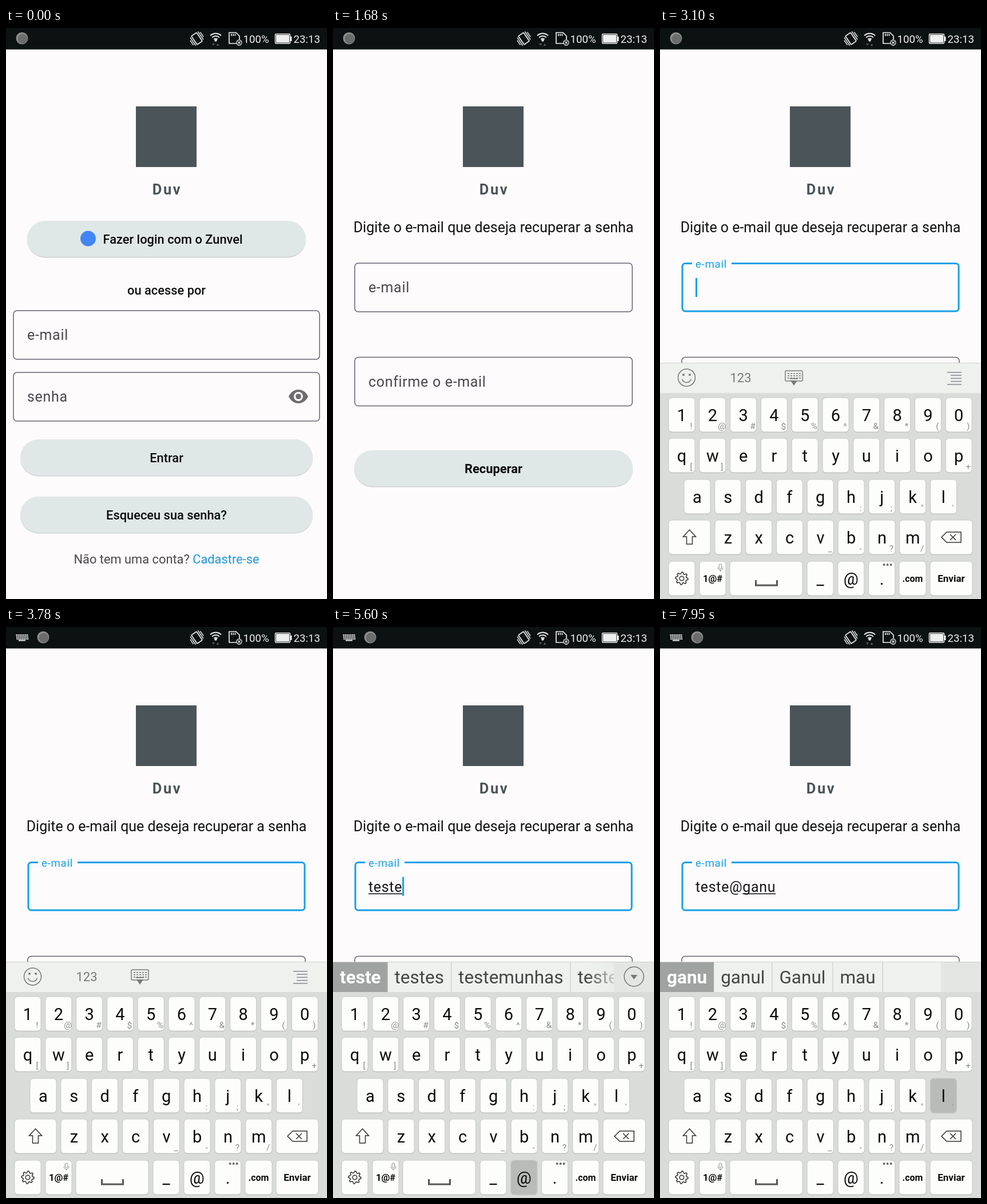
An HTML page with a canvas for the animation above (8 s loop, 561 by 998 pixels).

```html
<!DOCTYPE html>
<html lang="pt-BR">
<head>
<meta charset="utf-8">
<title>Recuperar senha</title>
<style>
html, body { margin: 0; width: 100%; height: 100%; overflow: hidden; background: #fdfbfb; }
canvas { display: block; width: 561px; height: 998px; }
</style>
</head>
<body>
<canvas id="stage" width="561" height="998"></canvas>
<script>
const W = 561, H = 998, LOOP = 8000, DP = 1.56;
const BG = '#fdfbfb', BLUE = '#15a0e8', SLATE = '#4b5459', BTN = '#e0e8e7', LINE = '#66616f';
const main = document.getElementById('stage').getContext('2d');
const buffer = document.createElement('canvas');
buffer.width = W;
buffer.height = H;
const layer = buffer.getContext('2d');
let c = main;

const clamp = v => Math.max(0, Math.min(1, v));
const span = (t, from, len) => clamp((t - from) / len);
const mix = (a, b, k) => a + (b - a) * k;

// ---------- drawing helpers ----------
function text(str, x, y, size, { weight = 400, color = '#111', align = 'left', gap = 0 } = {}) {
  c.font = `${weight} ${size}px Roboto, sans-serif`;
  c.letterSpacing = gap + 'px';
  c.textAlign = align;
  c.fillStyle = color;
  c.fillText(str, x, y);
  const w = c.measureText(str).width;
  c.letterSpacing = '0px';
  return w;
}

function box(x, y, w, h, r, fill, stroke, lw = 1) {
  c.beginPath();
  c.roundRect(x, y, w, h, r);
  if (fill) { c.fillStyle = fill; c.fill(); }
  if (stroke) { c.strokeStyle = stroke; c.lineWidth = lw; c.stroke(); }
}

function rect(x, y, w, h, fill) {
  c.fillStyle = fill;
  c.fillRect(x, y, w, h);
}

function disc(x, y, r, fill) {
  c.beginPath();
  c.arc(x, y, r, 0, 7);
  c.fillStyle = fill;
  c.fill();
}

function ring(x, y, r, stroke, lw = 1.5, a = 0, b = 7) {
  c.beginPath();
  c.arc(x, y, r, a, b);
  c.strokeStyle = stroke;
  c.lineWidth = lw;
  c.stroke();
}

function path(points, { fill, stroke, lw = 1.5, close = false }) {
  c.beginPath();
  for (let i = 0; i < points.length; i += 2) c.lineTo(points[i], points[i + 1]);
  if (close) c.closePath();
  if (fill) { c.fillStyle = fill; c.fill(); }
  if (stroke) { c.strokeStyle = stroke; c.lineWidth = lw; c.stroke(); }
}

// Draws a group on its own layer, then blends it as a whole.
function group(alpha, dy, draw) {
  layer.clearRect(0, 0, W, H);
  c = layer;
  draw();
  c = main;
  c.globalAlpha = alpha;
  c.drawImage(buffer, 0, dy);
  c.globalAlpha = 1;
}

// ---------- screens ----------
function button(x, y, w, label, { weight = 500, lx = 280.5, align = 'center' } = {}) {
  box(x, y + 1.5, w, 63, 31.5, '#cdd2d1');
  box(x, y, w, 63, 31.5, BTN);
  text(label, lx, y + 40, 14 * DP, { weight, align, color: '#0a0a0a' });
}

function field(x, y, w, label) {
  box(x, y, w, 85, 6, null, LINE, 1.5);
  text(label, x + 24, y + 51, 16 * DP, { color: '#4a4650', gap: .7 });
}

function brand() {
  rect(0, 0, W, H, BG);
  rect(227, 137, 106, 106, SLATE);
  text('Duv', 281.5, 291, 25.5, { weight: 700, color: SLATE, align: 'center', gap: 2.6 });
}

function eye(x, y) {
  c.beginPath();
  c.moveTo(x - 17, y);
  c.bezierCurveTo(x - 10, y - 16, x + 10, y - 16, x + 17, y);
  c.bezierCurveTo(x + 10, y + 16, x - 10, y + 16, x - 17, y);
  c.fillStyle = '#6f6c70';
  c.fill();
  disc(x, y, 8, BG);
  disc(x, y, 4.8, '#6f6c70');
}

function ripple(t) {
  const fade = 1 - span(t, 1150, 170);
  if (t < 950 || !fade) return;
  const tint = a => `rgba(20,160,232,${a * fade})`;
  c.save();
  c.beginPath();
  c.roundRect(25, 819, 511, 63, 31.5);
  c.clip();
  rect(25, 819, 511, 63, tint(.16 * span(t, 950, 60)));
  for (const start of [960, 990]) {
    const r = Math.min(420, Math.max(0, (t - start) * 2.1));
    disc(370 - r * .15, 851, r, tint(.12));
  }
  c.restore();
  text('Esqueceu sua senha?', 280.5, 859, 14 * DP, { weight: 500, align: 'center', color: '#0a0a0a' });
}

function login(t) {
  brand();
  button(37, 337, 487, 'Fazer login com o Zunvel', { lx: 169.5, align: 'left' });
  disc(143.5, 368, 13.5, '#4285f4');
  text('ou acesse por', 280.5, 466, 14 * DP, { weight: 500, align: 'center' });
  field(13, 494, 535, 'e-mail');
  field(13, 602, 535, 'senha');
  eye(511, 644);
  button(25, 719, 511, 'Entrar');
  button(25, 819, 511, 'Esqueceu sua senha?');
  ripple(t);
  const w = text('Não tem uma conta? ', 118.5, 936, 14 * DP, { color: '#4b474d' });
  text('Cadastre-se', 118.5 + w, 936, 14 * DP, { color: '#2196dc' });
}

// ---------- typing ----------
const FOCUS = 2800, LAG = 140;
const TAPS = [
  ['t', 4120], ['e', 4300], ['s', 4490], ['t', 4690], ['e', 5065],
  ['@', 5600], ['g', 6020], ['a', 6930], ['n', 7070], ['u', 7215], ['l', 7940]
].map(([key, at]) => ({ key, at, done: at + 65 }));

const HINTS = {
  t: ['tem', 'também', 'tudo', 'todos'],
  te: ['tem', 'tenho', 'tempo', 'ter'],
  tes: ['teste', 'testes', 'testa'],
  test: ['teste', 'testes', 'testar'],
  teste: ['testes', 'testemunhas', 'testemunho'],
  g: ['ganul', 'gestão', 'guia', 'guerra'],
  ga: ['ganul', 'gato', 'ganhar', 'garantir'],
  gan: ['ganul', 'ganhar', 'ganso'],
  ganu: ['ganul', 'Ganul', 'mau']
};

const typed = t => TAPS.filter(k => k.done <= t).map(k => k.key).join('');

function cursorOn(t) {
  const last = TAPS.reduce((m, k) => k.done <= t ? k.done : m, FOCUS);
  return (t - last) % 1000 < 500;
}

function mailField(t) {
  if (t < FOCUS) return field(38, 411, 485, 'e-mail');
  box(39, 411.5, 483, 83.5, 5, null, BLUE, 3);
  const k = 1 - (1 - span(t, FOCUS, 170)) ** 2;
  rect(56, 405, 69 * k, 12, BG);
  text('e-mail', 62, mix(462, 418.5, k), mix(16, 12, k) * DP, { color: BLUE, gap: .7 });
  const str = typed(t), size = 16 * DP, cut = str.indexOf('@') + 1;
  const head = text(str.slice(0, cut), 62, 463, size, { gap: .7, color: '#16161a' });
  const tail = text(str.slice(cut), 62 + head, 463, size, { gap: .7, color: '#16161a' });
  rect(62 + head, 465.5, tail, 1.6, '#16161a');
  if (cursorOn(t)) rect(62 + head + tail, 437, 3, 33, BLUE);
}

function recover(t) {
  brand();
  text('Digite o e-mail que deseja recuperar a senha', 280.5, 357, 16 * DP, { align: 'center' });
  mailField(t);
  field(38, 575.5, 485, 'confirme o e-mail');
  button(37, 738, 487, 'Recuperar', { weight: 700 });
}

// ---------- keyboard ----------
const STEP = 53.8;
const KEYS = [];
const rowY = row => Math.floor(646 + row * 71.5);
function addRow(row, x, labels, subs = '') {
  [...labels].forEach((label, i) =>
    KEYS.push({ label, sub: (subs[i] || ' ').trim(), x: x + i * STEP, y: rowY(row), w: 46 }));
}
function addKey(row, x, w, label, icon, size) {
  KEYS.push({ label, icon, size, x, y: rowY(row), w });
}
addRow(0, 15, '1234567890', '!@#$%^&*()');
addRow(1, 15, 'qwertyuiop', '[]       +');
addRow(2, 42, 'asdfghjkl', '     :;"\'');
addRow(3, 96, 'zxcvbnm', '   _-?/');
addKey(3, 15, 73, '', shiftIcon);
addKey(3, 472, 74, '', backIcon);
addKey(4, 15, 46, '', gearIcon);
addKey(4, 69, 46, '1@#', micIcon, 16.5);
addKey(4, 122, 127, '', spaceIcon);
addRow(4, 257, '_@.');
addKey(4, 418, 47, '.com', null, 16);
addKey(4, 472, 74, 'Enviar', null, 17);

function shiftIcon(x, y) {
  path([x, y - 13, x + 11, y - 1, x + 5, y - 1, x + 5, y + 12, x - 5, y + 12, x - 5, y - 1, x - 11, y - 1],
    { stroke: '#333', close: true });
}
function backIcon(x, y) {
  path([x - 17, y, x - 8, y - 9, x + 17, y - 9, x + 17, y + 9, x - 8, y + 9], { stroke: '#333', close: true });
  path([x - 2, y - 5, x + 8, y + 5], { stroke: '#333' });
  path([x + 8, y - 5, x - 2, y + 5], { stroke: '#333' });
}
function gearIcon(x, y) {
  const pts = [];
  for (let i = 0; i < 32; i++) {
    const a = i * Math.PI / 16, r = i % 4 < 2 ? 11 : 8.3;
    pts.push(x + r * Math.cos(a), y + r * Math.sin(a));
  }
  path(pts, { stroke: '#333', close: true });
  ring(x, y, 3.8, '#333');
}
function micIcon(x, y) {
  box(x + 11, y - 25, 5, 8, 2.5, null, '#888');
  ring(x + 13.5, y - 19, 4.5, '#888', 1, 0, Math.PI);
  path([x + 13.5, y - 15, x + 13.5, y - 12], { stroke: '#888', lw: 1 });
}
function spaceIcon(x, y) {
  path([x - 18, y + 3, x - 18, y + 12, x + 19, y + 12, x + 19, y + 3], { stroke: '#555', lw: 3 });
}

function drawKey(k, pressed) {
  const cx = k.x + k.w / 2;
  box(k.x, k.y + 1, k.w, 60, 6, '#b9bcb9');
  box(k.x, k.y, k.w, 60, 6, pressed ? '#b9bbb9' : '#fdfdfc', '#c6c9c6', 1);
  if (k.icon) k.icon(cx, k.y + 30);
  const sized = k.size > 0;
  text(k.label, cx, k.y + (sized ? 36 : 40.5), k.size || 29,
    { align: 'center', weight: sized ? 700 : 400, color: '#0b0b0b' });
  if (k.sub) text(k.sub, k.x + 39.5, k.y + 55, 15.5, { align: 'center', color: '#8c8e8c' });
  if (k.label === '.') for (let i = -1; i < 2; i++) disc(k.x + 33 + i * 6, k.y + 6, 2, '#666');
}

function toolbar() {
  const ink = '#777a78';
  ring(46.5, 611, 15, ink);
  disc(41, 606, 2, ink);
  disc(52, 606, 2, ink);
  ring(46.5, 611, 8.5, ink, 1.5, .3, Math.PI - .3);
  text('123', 141, 619, 22, { align: 'center', color: ink });
  box(219, 599, 30, 18, 2, null, ink, 1.5);
  for (let y = 603; y < 612; y += 4)
    for (let x = 223; x < 246; x += 5) rect(x, y, 3, 1.6, ink);
  rect(227, 612, 14, 1.6, ink);
  path([228, 616, 240, 616, 234, 625], { fill: ink });
  for (let i = 0; i < 5; i++) rect(i % 4 ? 508 : 502, 601 + i * 5.3, i % 4 ? 19 : 25, 1.5, '#85888f');
}

function hintBar(word, list) {
  const size = 31.5, pad = 12;
  c.save();
  c.beginPath();
  c.rect(0, 586, 491, 52);
  c.clip();
  c.font = `700 ${size}px Roboto, sans-serif`;
  let x = Math.max(74, c.measureText(word).width + 2 * pad);
  rect(0, 586, x, 52, '#a0a3a1');
  text(word, x / 2, 623, size, { weight: 700, color: '#fff', align: 'center' });
  for (const hint of list) {
    x += text(hint, x + pad, 623, size, { color: '#444746' }) + 2 * pad;
    rect(x, 586, 1, 52, '#c3c7c4');
    x += 1;
  }
  const more = x > 470;
  if (more) {
    const fade = c.createLinearGradient(445, 0, 491, 0);
    fade.addColorStop(0, 'rgba(233,236,233,0)');
    fade.addColorStop(1, 'rgba(233,236,233,.8)');
    rect(445, 586, 46, 52, fade);
  }
  c.restore();
  rect(491, 586, 70, 52, '#e3e6e3');
  if (more) {
    ring(526, 611, 17, '#777');
    path([520, 608, 532, 608, 526, 616], { fill: '#777' });
  }
}

function popup(key) {
  const x = key.x - 23, y = key.y - 109;
  box(x + 1, y + 2, 92, 106, 2, '#a9abb0');
  box(x, y, 92, 106, 2, '#fdfdfd', '#b4b7c2', 1.2);
  text(key.label, x + 46, y + 72, 56, { align: 'center', color: '#0b0b0b' });
}

function keyboard(t) {
  rect(0, 585, W, 413, '#d9dcd9');
  rect(0, 585, W, 53, '#eef1ee');
  rect(0, 585, W, 1, '#cfd2cf');
  const word = typed(t - LAG).split('@').pop();
  if (HINTS[word]) hintBar(word, HINTS[word]); else toolbar();
  const tap = TAPS.find(k => t >= k.at && t < k.at + 125);
  const active = tap && KEYS.find(k => k.label === tap.key);
  for (const k of KEYS) drawKey(k, k === active && t < tap.at + 105);
  if (active && t >= tap.at + 30) popup(active);
}

// ---------- status bar ----------
function statusBar(t) {
  const ink = '#eef0ef';
  rect(0, 0, W, 37.5, '#0c1211');
  const shown = t >= 3250;
  if (shown) {
    for (let y = 0; y < 3; y++)
      for (let x = 0; x < 7; x++) rect(17.5 + x * 3.1 + y * .4, 13 + y * 3.3, 2.3, 2.3, ink);
    rect(22, 22.5, 12, 2, ink);
  }
  const nx = shown ? 65 : 28;
  disc(nx, 18, 10.5, '#8b8e8c');
  disc(nx + 1, 19, 8.5, '#6a6d6b');

  c.save();
  c.translate(333.5, 18.5);
  c.rotate(-.6);
  box(-5.5, -9, 11, 18, 1, null, ink, 1.7);
  path([-8.5, -8, -8.5, 9], { stroke: ink });
  path([8.5, -9, 8.5, 8], { stroke: ink });
  path([-11.3, -4, -11.3, 6], { stroke: ink });
  path([11.3, -6, 11.3, 4], { stroke: ink });
  c.restore();

  for (const r of [4.5, 9, 13.5]) ring(366.5, 23, r, ink, 2, -2.35, -.79);
  disc(366.5, 21.5, 2.2, ink);
  path([360, 27, 365, 27, 362.5, 31], { fill: '#56594f' });
  path([367.5, 31, 372.5, 31, 370, 27], { fill: '#56594f' });

  path([403, 27, 390, 27, 390, 8, 402, 8, 408, 14, 408, 20], { stroke: ink, lw: 1.7 });
  for (let i = 0; i < 3; i++) rect(393 + i * 3.3, 10, 1.6, 4, ink);
  ring(407.5, 25.5, 4.5, ink, 1.3);
  path([405.5, 23.5, 409.5, 27.5], { stroke: ink, lw: 1.2 });
  path([409.5, 23.5, 405.5, 27.5], { stroke: ink, lw: 1.2 });

  text('100%', 414.5, 26, 18.7, { color: ink });
  box(470.5, 10.5, 26, 16.5, 1.5, null, ink, 1.5);
  rect(472, 12, 23, 13.5, ink);
  rect(497, 15, 2.5, 8, ink);
  text('23:13', 502.5, 26, 18.7, { color: ink });
}

// ---------- timeline ----------
const OPEN = 1320, KEYS_IN = 2890;

function render(t) {
  if (t < OPEN) login(t);
  else if (t < OPEN + 350) {
    login(t);
    const p = 1 - (1 - span(t, OPEN, 350)) ** 5;
    const alpha = p < .5 ? p / 2 : p < .9 ? mix(.25, .7, (p - .5) / .4) : mix(.7, 1, (p - .9) / .1);
    group(alpha, (1 - p) * 77, () => recover(t));
  } else recover(t);

  if (t >= KEYS_IN) {
    const p = 1 - (1 - span(t, KEYS_IN, 220)) ** 2.7;
    if (p < 1) group(p, (1 - p) * 83, () => keyboard(t));
    else keyboard(t);
  }
  statusBar(t);
}

let begin;
function tick(now) {
  begin ??= now;
  render((now - begin) % LOOP);
  requestAnimationFrame(tick);
}
render(0);
requestAnimationFrame(tick);
</script>
</body>
</html>
```
